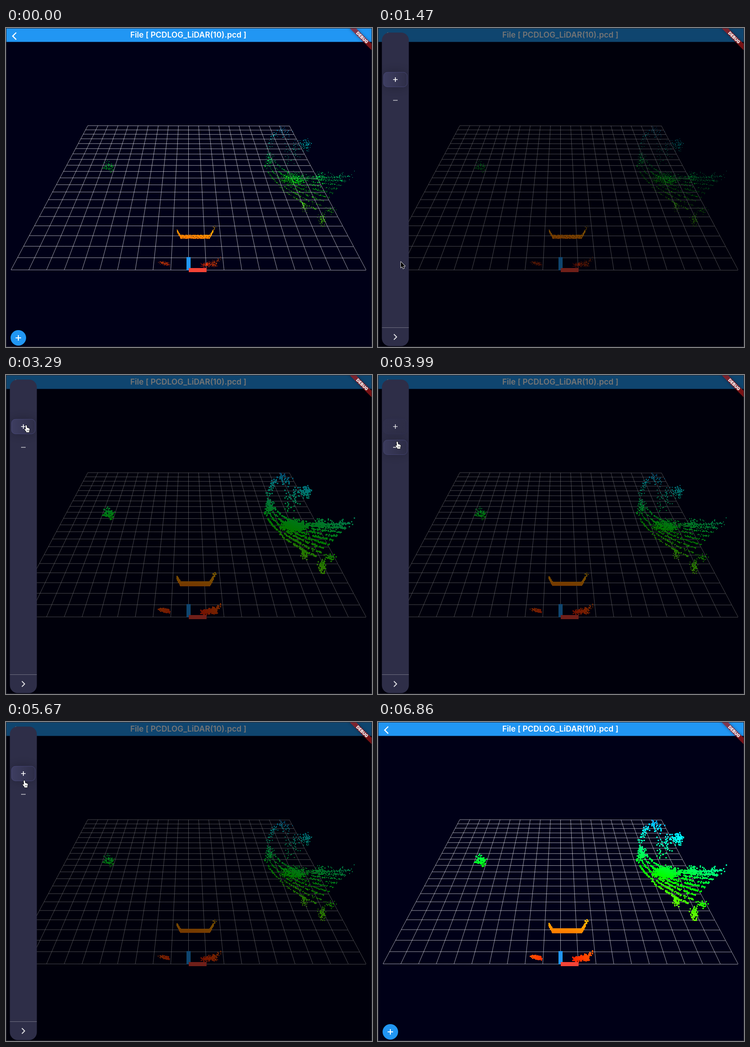
Recreate the animation shown at these times as an HTML page with a canvas. Size 801 by 699 pixels, loop 7210 ms.

```html
<!DOCTYPE html>
<html lang="en">
<head>
<meta charset="utf-8">
<title>Point cloud viewer</title>
<style>
  html, body { margin: 0; width: 100%; height: 100%; overflow: hidden; background: #000017; }
  canvas { display: block; }
</style>
</head>
<body>
<canvas id="stage" width="801" height="699"></canvas>
<script>
const c = document.getElementById('stage').getContext('2d');
const LOOP = 7210, TICK = 70;
const BLUE = '#2196f3', PANEL = '#2e2e48';
const PLUS_Y = 113, MINUS_Y = 158.5;
const clamp = v => Math.max(0, Math.min(1, v));
const mix = (a, b, u) => a + (b - a) * u;
const smooth = u => u * u * (3 - 2 * u);

// ---- helpers ----
function rect(x, y, w, h, color) {
  c.fillStyle = color;
  c.fillRect(x, y, w, h);
}
function line(x0, y0, x1, y1, color, width) {
  c.beginPath();
  c.moveTo(x0, y0);
  c.lineTo(x1, y1);
  c.strokeStyle = color;
  c.lineWidth = width;
  c.stroke();
}
function plus(x, y, r, color, width) {
  line(x - r, y, x + r, y, color, width);
  line(x, y - r, x, y + r, color, width);
}
// dir -1 points left, 1 points right
function chevron(x, y, r, dir, color, width) {
  c.beginPath();
  c.moveTo(x - r / 2 * dir, y - r);
  c.lineTo(x + r / 2 * dir, y);
  c.lineTo(x - r / 2 * dir, y + r);
  c.strokeStyle = color;
  c.lineWidth = width;
  c.stroke();
}
function text(str, x, y, font) {
  c.font = font;
  c.fillStyle = '#fff';
  c.textAlign = 'center';
  c.textBaseline = 'middle';
  c.fillText(str, x, y);
}

// ---- point cloud ----
let seed = 20;
const rnd = () => (seed = (seed * 16807) % 2147483647) / 2147483647;
const spread = r => (rnd() + rnd() + rnd() - 1.5) * r;
const cloud = [];

const rowWidth = y => 777 - (530 - y) * 1.0633;

// Hue grows with the distance on the ground plane
function add(x, y) {
  const w = rowWidth(y);
  const r = Math.hypot((x - 399.5) / w * 20, (777 / w - 1) / 0.0381);
  cloud.push({ x, y, color: `hsl(${10.6 * r - .065 * r * r},100%,50%)` });
}
function blob(n, x, y, rx, ry) {
  while (n--) add(x + spread(rx), y + spread(ry));
}
function streak(n, jitter, x0, y0, x1, y1, sag) {
  while (n--) {
    const u = rnd();
    add(mix(x0, x1, u) + spread(jitter),
        mix(y0, y1, u) + sag * 4 * u * (1 - u) + spread(jitter));
  }
}

// orange bumper: flat with raised ends
for (let i = 0; i < 1700; i++) {
  const u = rnd() * 2 - 1, rise = Math.max(0, Math.abs(u) - .8) / .2;
  add(414 + 40 * u, 457.5 - 14 * rise + (rnd() - .5) * (8 - 3 * rise));
}
blob(10, 457, 438, 4, 5);

// red patches beside the axes
streak(90, 4, 338, 513, 356, 518, 0);
streak(170, 5, 428, 519, 460, 518, 0);
streak(45, 5, 440, 516, 471, 506, 0);

// left patch and right-hand thickets
blob(75, 226, 304, 13, 11);
blob(30, 610, 229, 16, 10);
blob(85, 655, 257, 13, 12);
blob(50, 627, 275, 18, 24);
blob(75, 577, 288, 8, 14);
blob(400, 629, 330, 25, 13);
blob(80, 688, 326, 14, 10);
blob(65, 722, 327, 32, 9);
blob(50, 652, 391, 6, 12);
blob(80, 692, 420, 8, 14);
blob(30, 710, 401, 14, 9);
add(762, 313);

// quarter-ellipse edge at the far right
for (let i = 0; i < 55; i++) {
  const a = Math.PI * (1 + rnd() / 2);
  add(608 + 35 * Math.cos(a) + spread(6), 282 + 62 * Math.sin(a) + spread(6));
}
// left rim lines, then scan lines fanning to the lower right
for (let k = 0; k < 4; k++)
  streak(42, 1.5, 565 + 6 * k, 299 - 5 * k, 602 + 8 * k, 345 - 9 * k, 7);
for (let u = 0; u <= 1; u += 1 / 8)
  streak(70, 2, 600 + 60 * u, 349 - 24 * u, 682 + 70 * u, 399 - 74 * u, 4 - 2 * u);

// ---- timeline ----
const taps = [
  { at: 2450, step: 1 }, { at: 2800, step: 1 },
  { at: 3850, step: -1 }, { at: 4340, step: -1 },
  { at: 5110, step: 1 }, { at: 5740, step: 1 }
];
const sizeAt = t => taps.reduce((s, tap) => s + (t >= tap.at ? tap.step : 0), 1);
const minusAt = t => clamp((t - 3780) / 250) - clamp((t - 5040) / 250);

const OPEN = 950, CLOSE = 6500;
function spring(ms) {
  const x = Math.max(0, ms) * 0.02236;
  return 1 - Math.exp(-x) * (1 + x);
}
const openAt = t => spring(t - OPEN) - spring(t - CLOSE);

const SHOW = 280, HIDE = 6860;
const moves = [
  { from: 280, to: 630, x: 30, y: 680 },
  { from: 910, to: 1050, x: 52, y: 653 },
  { from: 1050, to: 2310, x: 44, y: 110 },
  { from: 3290, to: 3500, x: 42, y: 146 },
  { from: 4410, to: 4970, x: 40, y: 128 },
  { from: 6090, to: 6370, x: 38, y: 674 }
];
function pointerAt(t) {
  let x = 20, y = 699;
  for (const m of moves) {
    const e = smooth(clamp((t - m.from) / (m.to - m.from)));
    x = mix(x, m.x, e);
    y = mix(y, m.y, e);
  }
  return [x, y];
}

// ---- drawing ----
function drawGrid() {
  const color = 'rgba(255,255,255,.62)';
  for (let k = 0; k <= 20; k++) {
    line(179 + 22.05 * k, 214, 11 + 38.85 * k, 530, color, 1);
    const w = 777 / (1.762 - 0.0381 * k), y = 530 - (777 - w) * 0.9405;
    line(399.5 - w / 2, y, 399.5 + w / 2, y + .8, color, 1);
  }
}

function drawScene(size) {
  rect(0, 0, 801, 699, '#000017');
  drawGrid();
  for (const p of cloud)
    rect(Math.round(p.x - size / 2), Math.round(p.y - size / 2), size, size, p.color);
  rect(395, 502, 9, 29, BLUE);
  rect(400, 526, 39, 9, '#f44336');

  rect(0, 1, 800, 29.5, BLUE);
  text('File [ PCDLOG_LiDAR(10).pcd ]', 399, 15.5, '600 17.25px Inter, sans-serif');
  chevron(18.5, 17.7, 7.7, -1, '#fff', 2.4);

  c.beginPath();
  c.arc(27, 679, 17, 0, 7);
  c.fillStyle = BLUE;
  c.fill();
  plus(27, 679, 6, '#fff', 2);
}

function drawHighlight(y, alpha) {
  c.save();
  c.globalAlpha = alpha;
  const fill = c.createLinearGradient(12, 0, 64, 0);
  fill.addColorStop(0, '#3e3e61');
  fill.addColorStop(1, PANEL);
  c.beginPath();
  c.roundRect(12, y - 16, 52, 32, 8.5);
  c.shadowColor = 'rgba(0,0,0,.28)';
  c.shadowBlur = 25;
  c.fillStyle = fill;
  c.fill();
  c.shadowColor = 'transparent';
  c.strokeStyle = 'rgba(95,95,167,.45)';
  c.lineWidth = 1;
  c.stroke();
  c.restore();
}

function drawDrawer(open, minusOn) {
  const white = a => `rgba(255,255,255,${a})`;
  c.save();
  c.translate(-75 * (1 - open), 0);
  c.beginPath();
  c.roundRect(8.5, 10, 59, 687, 17);
  c.fillStyle = PANEL;
  c.fill();
  c.clip();
  drawHighlight(PLUS_Y, 1 - minusOn);
  drawHighlight(MINUS_Y, minusOn);
  plus(38, PLUS_Y, 5, white(mix(1, .72, minusOn)), 1.7);
  line(33, MINUS_Y, 43, MINUS_Y, white(mix(.72, 1, minusOn)), 1.7);
  line(8, 656.5, 68, 656.5, white(.32), 1);
  chevron(37.8, 677, 6, 1, white(.85), 2);
  c.restore();
}

const arrow = new Path2D('M0 0V13L3 10.3L5 15L7.3 14L5.3 9.5H9.3Z');
const hand = new Path2D('M-1.4 1Q0-.8 1.4 1L2 6Q3.4 5 4.2 6.6Q5.6 5.8 6.2 7.4' +
  'Q8 7 7.8 9L6.8 13V15.5H.2V14L-3.4 9.6Q-3.8 7.8-2 8.2L-.6 9.4Z');

function drawPointer(x, y) {
  const isHand = y < 172 || y > 662;
  const shape = isHand ? hand : arrow;
  c.save();
  c.translate(x, y);
  c.lineJoin = 'round';
  c.lineWidth = 1.6;
  c.strokeStyle = isHand ? '#000' : '#fff';
  c.fillStyle = isHand ? '#fff' : '#000';
  c.stroke(shape);
  c.fill(shape);
  if (isHand)
    for (let fx = 2; fx < 6; fx += 1.8) line(fx, 10, fx, 13, '#000', .6);
  c.restore();
}

function drawRibbon() {
  c.save();
  c.beginPath();
  c.rect(0, 1, 800, 698);
  c.clip();
  c.translate(799.5, 1);
  c.rotate(Math.PI / 4);
  c.scale(.83, .83);
  c.shadowColor = 'rgba(0,0,0,.5)';
  c.shadowBlur = 6;
  rect(-45, 28, 90, 12, 'rgba(183,28,28,.66)');
  c.shadowColor = 'transparent';
  text('DEBUG', 0, 34.5, '900 11.2px Inter, sans-serif');
  c.restore();
}

function draw(t) {
  const open = openAt(t);
  drawScene(sizeAt(t));
  rect(0, 0, 801, 699, `rgba(0,0,0,${.54 * open})`);
  if (open > .001) drawDrawer(open, minusAt(t));
  if (t >= SHOW && t < HIDE) drawPointer(...pointerAt(t));
  drawRibbon();
  c.strokeStyle = '#2a2a34';
  c.lineWidth = 1;
  c.strokeRect(.5, .5, 800, 698);
}

const start = performance.now();
function loop() {
  const t = (performance.now() - start) % LOOP;
  draw(Math.floor(t / TICK) * TICK);
  requestAnimationFrame(loop);
}
loop();
</script>
</body>
</html>
```
